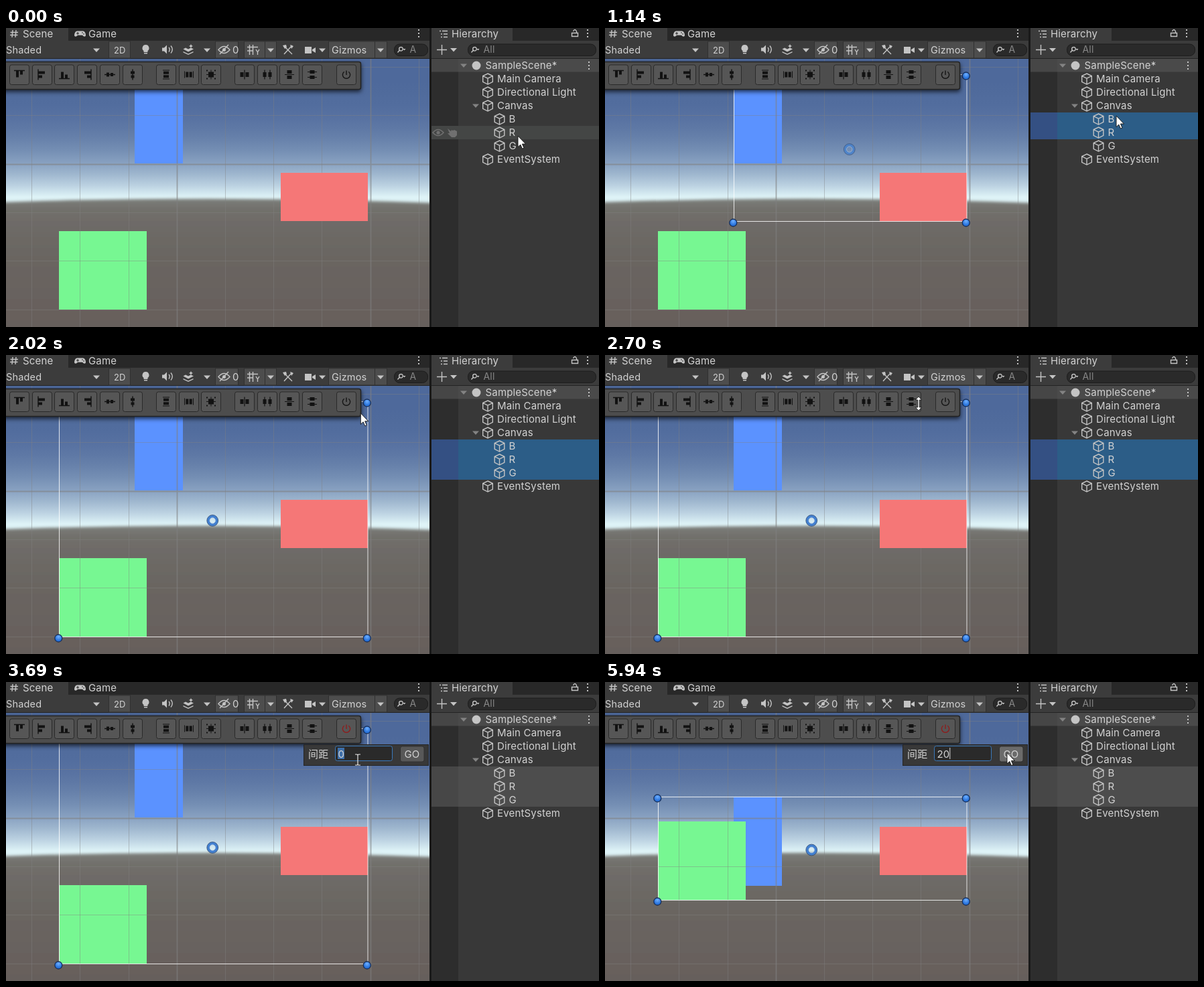
Animation of 885 by 446 pixels, one loop 6.97 s. Source, as an HTML page:

```html
<!DOCTYPE html>
<html lang="en">
<head>
<meta charset="utf-8">
<title>Scene layout tools</title>
<style>
  html, body { margin: 0; width: 100%; height: 100%; overflow: hidden; background: #383838; }
  svg { display: block; width: 885px; height: 446px; }
  text { font: 15px Inter, sans-serif; letter-spacing: .17px; fill: #d2d2d2; }
  .tool { font-size: 14.5px; }
  .hint { font-size: 14px; fill: #868686; }
  .cjk { font-family: "Noto Sans CJK SC", "Noto Sans CJK", sans-serif; }
  .line { fill: none; stroke: #c4c4c4; stroke-width: 1.4; }
  .solid { fill: #c4c4c4; }
</style>
</head>
<body>
<svg id="stage" viewBox="0 0 885 446" xmlns="http://www.w3.org/2000/svg"></svg>
<script>
const LOOP = 6970;
const stage = document.getElementById('stage');

// Markup helpers
const box = (x, y, w, h, fill, more = '') =>
  `<rect x="${x}" y="${y}" width="${w}" height="${h}" fill="${fill}" ${more}/>`;
const label = (x, y, s, more = '') => `<text x="${x}" y="${y}" ${more}>${s}</text>`;
const line = (d, more = '') => `<path class="line" d="${d}" ${more}/>`;
const solid = d => `<path class="solid" d="${d}"/>`;
const group = (id, body) => `<g id="${id}">${body}</g>`;
const at = (x, y, body) => `<g transform="translate(${x} ${y})">${body}</g>`;
const drop = (x, y, fill = '#c4c4c4') => `<path d="M${x - 5} ${y - 2.5}h10l-5 5.5z" fill="${fill}"/>`;
const kebab = (x, y) => solid([-5, 0, 5].map(d => `M${x - 1} ${y + d - 1}h2v2h-2z`).join(''));
const search = (x, w, hint) =>
  box(x, 24, w, 17.5, '#2a2a2a', 'rx="8" stroke="#1d1d1d"') +
  line(`M${x + 10} 28.5a2.8 2.8 0 1 1 0 5.600a2.8 2.8 0 1 1 0-5.600M${x + 8} 33l-3 3.500`) +
  solid(`M${x + 13} 31h4l-2 2.500z`) + label(x + 23, 37, hint, 'class="hint"');

// Objects in the scene, in drawing order
const shapes = {
  B: { x: 192, y: 69, w: 72, h: 133, fill: '#5b92ff' },
  G: { x: 79, y: 303, w: 131, h: 117, fill: '#77f792' },
  R: { x: 410, y: 216, w: 130, h: 72, fill: '#f57777' }
};
const spaced = { B: 171, G: 208, R: 216 };
const shape = id => {
  const s = shapes[id];
  return box(s.x, s.y, s.w, s.h, s.fill, `id="${id}"`);
};

function grid() {
  let d = '', major = '';
  const add = (i, n, path) => i % 4 === n ? major += path : d += path;
  for (let i = 0; i < 9; i++) add(i, 3, `M${Math.floor(38.6 + i * 72.2) + .5} 46V446`);
  for (let i = 0; i < 6; i++) add(i, 2, `M0 ${Math.floor(58.6 + i * 72.3) + .5}H632`);
  return `<g fill="none" stroke="#808080"><path d="${d}" opacity=".42"/>
    <path d="${major}" stroke-width="1.8" opacity=".6"/></g>`;
}

function sceneView() {
  const anchor = [45, 135, 225, 315].map(a =>
    `<path transform="translate(226 174.5) rotate(${a})" d="M2 0L15.500-4.500V4.500Z" stroke-width="1.3"/>`).join('');
  return `<g clip-path="url(#view)">
    ${box(0, 46, 632, 400, 'url(#sky)')}
    <path d="M-9 260Q316 249 641 261V460H-9Z" fill="url(#ground)" filter="url(#soft)"/>
    ${shape('B')}${shape('G')}${grid()}${shape('R')}
    ${group('anchors', `<g fill="none" stroke="#fff">
      <path d="M192.5 69.5h72v132h-72zM79.5 303.5h130.500v116.500h-130.500z" opacity=".55"/>${anchor}</g>`)}
    ${group('gizmo', `<rect id="frame" fill="none" stroke="#fff" opacity=".82"/>
      <g id="pivot" fill="none"><circle r="6.3" stroke="#4280d0" stroke-width="4"/>
        <circle r="8.4" stroke="#2b456e" stroke-width=".8"/><circle r="4.2" stroke="#b4cae2" stroke-width=".8"/></g>
      ${'<circle class="knob" r="5.5" fill="url(#ball)" stroke="#17305c" stroke-width="1.3"/>'.repeat(4)}`)}
    ${alignBar()}${popup()}
  </g>`;
}

// Align icons: blocks beside guides; flip swaps the axes
const icon = (flip, ...parts) =>
  `<path d="${parts.map(([x, y, w, h]) => flip ? `M${y} ${x}h${h}v${w}h-${h}z` : `M${x} ${y}h${w}v${h}h-${w}z`).join('')}" fill="#121212"/>`;

const align = (edge, flip) => {
  const long = edge ? 10 : 6, short = edge ? 6 : 5;
  const from = size => (edge * (12 - size) - size) / 2;
  return icon(flip, [-8, edge * 6 - .7, 16, 1.4], [-5, from(long), 4, long], [1, from(short), 4, short]);
};
const rails = flip =>
  icon(flip, ...[-1, 1].flatMap(s => [[-5, s * 6.5 - .5, 10, 1], [-4, s * 2.7 - 2, 8, 4]]));
const spread = (guides, flip) =>
  icon(flip, ...guides.map(g => [g - .6, -7, 1.2, 14]), ...[-1, 1].map(s => [s * 4 - 2.5, -3.5, 5, 7]));
const burst = () => icon(false, [-4, -4, 8, 8], [-.5, -7, 1, 14], [-7, -.5, 14, 1],
  ...[-7, 5].flatMap(x => [-7, 5].map(y => [x, y, 2, 2])));

function alignBar() {
  const groups = [
    [20, [align(-1), align(-1, true), align(1), align(1, true), align(0), align(0, true)]],
    [239, [rails(), rails(true), burst()]],
    [356, [spread([0]), spread([-4, 4]), spread([0], true), spread([-4, 4], true)]],
    [508, [line('M0-6V.5M-3.300-4.300a5.600 5.600 0 1 0 6.600 0', 'id="power"')]]
  ];
  const button = body => box(-14.5, -14.5, 29, 29.5, '#565656', 'rx="3" stroke="#2a2a2a"') + body;
  return `<g style="filter:drop-shadow(0 3px 3px #000a)">
      ${box(-6, 50.5, 535.5, 41, '#4d4d4d', 'rx="3" stroke="#232323" stroke-width="1.5"')}</g>` +
    groups.map(([x, icons]) => icons.map((body, i) => at(x + Math.round(i * 33.7), 69.5, button(body))).join('')).join('');
}

function popup() {
  return group('popup',
    box(444.5, 93.5, 186, 31, '#383838', 'stroke="#252525"') +
    label(451, 112.5, '间距', 'class="cjk"') +
    box(491.5, 95.5, 85, 22, '#2a2a2a', 'id="field" rx="3"') +
    box(495, 98, 10, 17, '#3d6ea8', 'id="mark"') +
    label(495.5, 112.5, '', 'id="value"') +
    box(0, 98, 1, 17, '#d8d8d8', 'id="caret"') +
    box(588.5, 96, 35.5, 23, '#585858', 'id="go" rx="3" stroke="#303030"') +
    label(606, 112.5, 'GO', 'text-anchor="middle"'));
}

function sceneChrome() {
  const cell = (x, w) => box(x, 20, w, 25, '#4d4d4d', 'stroke="#303030"');
  return box(0, 0, 632, 19, '#282828') + box(0, 0, 93, 20, '#3c3c3c') +
    box(0, 19, 632, 27, '#3c3c3c') + box(0, 45, 632, 1, '#232323') +
    line('M10 3L9 14M15 3L14 14M6.5 6.5H18M6 10.5H17.5') + label(25, 14, 'Scene') +
    solid('M106 4.5h9q4 1 4 7q-2 3-5-.8h-7q-3 3.800-5 .8q0-6 4-7z') +
    '<path d="M105 8h4M107 6v4M113 7h2M115 9h2" stroke="#282828"/>' +
    label(123, 14, 'Game') + kebab(616, 8) +
    cell(153.5, 32) + cell(312.5, 34) + cell(355.5, 31) + cell(386.5, 17) + cell(481.5, 69) + cell(550.5, 18) +
    label(0, 38, 'Shaded', 'class="tool"') +
    label(161, 37.5, '2D', 'font-weight="500" style="font-size:13px"') +
    solid('M208.5 25a5 5 0 0 1 3 9v2h-6v-2a5 5 0 0 1 3-9zM206 37h5v1.500h-5z') +
    solid('M233 29.5h3l4-4v13l-4-4h-3z') + line('M243 29q2.500 3 0 6.500M246 26.500q4.500 5.500 0 11') +
    solid('M264.5 31.5l3.500-2l4 2l4-2l4 2l-8 4zM264.5 35l7.500 3.500l7.500-3.500v1.500l-7.500 3.500l-7.500-3.500zM276 24l1 2l2 1l-2 1l-1 2l-1-2l-2-1l2-1z') +
    line('M317 32.5q8.500-10 17 0q-8.500 10-17 0zM319 39L332 25') + '<circle cx="325.5" cy="32.5" r="2.5" class="solid"/>' +
    label(338, 38, '0') +
    line('M363.5 25V40M368.5 25V40M360 28.500H376M360 34H368M373 32l2.500 4l2.500-4M375.500 36v4') +
    line('M415 27l12 12M427 26l-12 13', 'stroke-width="2.5"') + solid('M413 26l5-1l1 4l-3 2zM424 25l5 2l-3 4z') +
    solid('M446 28h10v10h-10zM457 32l5-3v8l-5-3z') +
    label(486, 38, 'Gizmos', 'class="tool"') +
    [135, 300, 395, 472, 559].map(x => drop(x, 33)).join('') + search(579.5, 50, 'A');
}

const cube = (x, y) => at(x, y,
  line('M0-8L7.300-4.500V4.300L0 8L-7.300 4.300V-4.500ZM-7.300-4.500L0-.8L7.300-4.500M0-.8V8', 'stroke-width="1.2"'));

function hierarchy() {
  const names = ['Main Camera', 'Directional Light', 'Canvas', 'B', 'R', 'G', 'EventSystem'];
  const row = (name, i) => {
    const deep = name.length === 1 ? 17.5 : 0;
    return cube(719 + deep, 76 + i * 20) + label(733 + deep, 81 + i * 20, name);
  };
  const band = (y, h, gutter, fill) => box(635, y, 40, h, gutter) + box(675, y, 210, h, fill);
  return box(632, 0, 3, 446, '#191919') +
    box(635, 0, 250, 19, '#282828') + box(635, 0, 121, 20, '#3c3c3c') +
    box(635, 19, 250, 27, '#3c3c3c') + box(635, 45, 250, 1, '#232323') +
    line('M647 4.5h2M651 4.5h8M649 9h2M653 9h6M649 13.5h2M653 13.5h6') + label(665, 14, 'Hierarchy') +
    line('M844.5 7.5h9v5h-9zM851.5 7.500V5q-2.500-5-5 0') + kebab(868, 8) +
    line('M643 32.5h15M650.5 25v15', 'stroke-width="2"') + drop(668, 32.5) + search(689.5, 191, 'All') +
    band(46, 400, '#2d2d2d', '#383838') + band(46, 19.5, '#464646', '#4a4a4a') +
    box(635, 146, 250, 20, '#444645', 'id="hover"') +
    ['B', 'R', 'G'].map((n, i) => group('row' + n, band(126 + i * 20, 20, '#345083', '#2c5d87'))).join('') +
    group('dim', band(126, 60, '#474747', '#4d4d4d')) +
    group('tools', `<path d="M637 0q8-9 16 0q-8 9-16 0z" fill="none" stroke="currentColor" stroke-width="1.5"/>
      <circle cx="645" r="2.6" fill="currentColor"/>
      <path d="M659-6l5 4l1-2l2 1l2-1l2 1l2 1v6l-3 3h-5l-6-6l3 0z" fill="currentColor"/>`) +
    drop(683, 56, '#838383') + '<circle cx="702" cy="56" r="6.5" class="solid"/>' +
    label(715.5, 61, 'SampleScene*', 'font-weight="700"') + kebab(870, 56) +
    drop(701, 116, '#838383') + names.map(row).join('');
}

const pointers =
  group('arrow', '<path d="M0 0V16.500L3.800 13L6.500 19L9 18L6.400 12H11.500Z" fill="#fff" stroke="#111" stroke-width=".9"/>') +
  group('beam', '<path d="M-4-8h3l1 1l1-1h3M0-7V7M-4 8h3l1-1l1 1h3" fill="none" stroke="#e8e8e8" stroke-width="1.2"/>') +
  group('resize', '<path d="M0-10.500l4.500 5H1.200V5.500H4.500L0 10.500L-4.500 5.500H-1.200V-5.500H-4.500Z" fill="#fff" stroke="#111" stroke-width=".8"/>') +
  '<circle id="press" r="15" fill="#d8d020" opacity=".66"/>';

// Vertical gradient between two colours, bent by a power
const mix = (a, b, p) => a.map((v, i) => Math.round(v + (b[i] - v) * p));
const fade = (id, y1, y2, a, b, power) =>
  `<linearGradient id="${id}" gradientUnits="userSpaceOnUse" x1="0" y1="${y1}" x2="0" y2="${y2}">` +
  Array.from({ length: 13 }, (_, i) =>
    `<stop offset="${i / 12}" stop-color="rgb(${mix(a, b, (i / 12) ** power)})"/>`).join('') + '</linearGradient>';

stage.innerHTML = `<defs>
  ${fade('sky', 46, 252, [78, 105, 155], [222, 243, 247], 3.2)}
  ${fade('ground', 254, 446, [124, 127, 123], [102, 95, 91], .3)}
  <radialGradient id="ball" cy=".3"><stop stop-color="#6fb0ff"/><stop offset="1" stop-color="#2873dc"/></radialGradient>
  <filter id="soft"><feGaussianBlur stdDeviation="2.2"/></filter>
  <clipPath id="view"><path d="M0 46H632V446H0Z"/></clipPath>
  </defs>` + sceneView() + sceneChrome() + hierarchy() + group('pointer', pointers);

const el = {};
stage.querySelectorAll('[id]').forEach(n => el[n.id] = n);
const knobs = stage.querySelectorAll('.knob');
const set = (n, attrs) => { for (const k in attrs) n.setAttribute(k, attrs[k]); };
const show = (n, on) => { n.style.display = on ? '' : 'none'; };

// Pointer moves: start, end, x, y
const moves = [
  [700, 840, 763, 131], [1150, 1430, 759, 176], [1690, 2230, 468, 63], [2330, 2440, 465, 64],
  [2690, 2700, 468, 72.5], [3210, 3420, 525, 116], [5065, 5200, 560, 92], [5200, 5550, 600, 105.5]
];
const clicks = [330, 1010, 1590, 2860, 3590, 5880];
const DONE = 5940;

const easeOut = p => 1 - (1 - p) ** 1.64;

function pointerAt(t) {
  let pos = [764, 161];
  for (const [from, to, x, y] of moves) {
    if (t <= from) break;
    const p = easeOut(Math.min(1, (t - from) / (to - from)));
    pos = [pos[0] + (x - pos[0]) * p, pos[1] + (y - pos[1]) * p];
  }
  return pos;
}

function drawGizmo(ids, top) {
  const list = ids.map(id => shapes[id]);
  const l = Math.min(...list.map(s => s.x)) + .5;
  const r = Math.max(...list.map(s => s.x + s.w));
  const t = Math.min(...ids.map(top)) + .5;
  const b = Math.max(...ids.map(id => top(id) + shapes[id].h)) + .5;
  set(el.frame, { x: l, y: t, width: r - l, height: b - t });
  set(el.pivot, {
    transform: `translate(${(l + r) / 2 - 1.5} ${(t + b) / 2 + 2})`,
    opacity: .25 + ids.length * .25
  });
  knobs.forEach((k, i) => set(k, { cx: (i % 2 ? r : l) - 1.2, cy: (i < 2 ? t : b) + 2 }));
}

function draw(t) {
  const done = t >= DONE;
  const top = id => done ? spaced[id] : shapes[id].y;
  for (const id in shapes) set(el[id], { y: top(id) });

  // The scene follows each click in the list a little later
  const picked = ['R', 'B', 'G'].filter((_, i) => t >= clicks[i] + 70);
  show(el.gizmo, picked.length);
  show(el.anchors, picked.length === 1);
  if (picked.length) drawGizmo(picked, top);
  ['R', 'B', 'G'].forEach((id, i) => show(el['row' + id], t >= clicks[i]));

  const opened = t >= 2920;
  show(el.dim, opened);
  show(el.hover, t < 330);
  show(el.tools, t < 1010);
  set(el.tools, {
    transform: `translate(0 ${t < 790 ? 156 : 136})`,
    color: t >= 330 && t < 790 ? '#5f8ab5' : '#707070'
  });

  const focus = t >= 3590, typed = '20'.slice(0, (t >= 4330) + (t >= 4480));
  show(el.popup, opened);
  el.power.style.stroke = opened ? '#8e1d1d' : '#151515';
  set(el.field, { stroke: focus ? '#3a79bb' : '#1b1b1b' });
  show(el.mark, focus && !typed);
  show(el.caret, typed);
  set(el.caret, { x: 495.5 + typed.length * 9.4 });
  el.value.textContent = typed || '0';

  const [x, y] = pointerAt(t);
  const resize = t >= 2700 && t < 3210;
  const beam = t >= 3400 && t < 5200;
  set(el.pointer, { transform: `translate(${x.toFixed(1)} ${y.toFixed(1)})` });
  set(el.go, { fill: t > 5000 && x > 588 ? '#6b6b6b' : '#585858' });
  show(el.resize, resize);
  show(el.beam, beam);
  show(el.arrow, !resize && !beam);
  show(el.press, !done && clicks.some(c => t >= c && t < c + 100));
}

const start = performance.now();
function tick(now) {
  draw(Math.max(0, now - start) % LOOP);
  requestAnimationFrame(tick);
}
draw(0);
requestAnimationFrame(tick);
</script>
</body>
</html>
```
